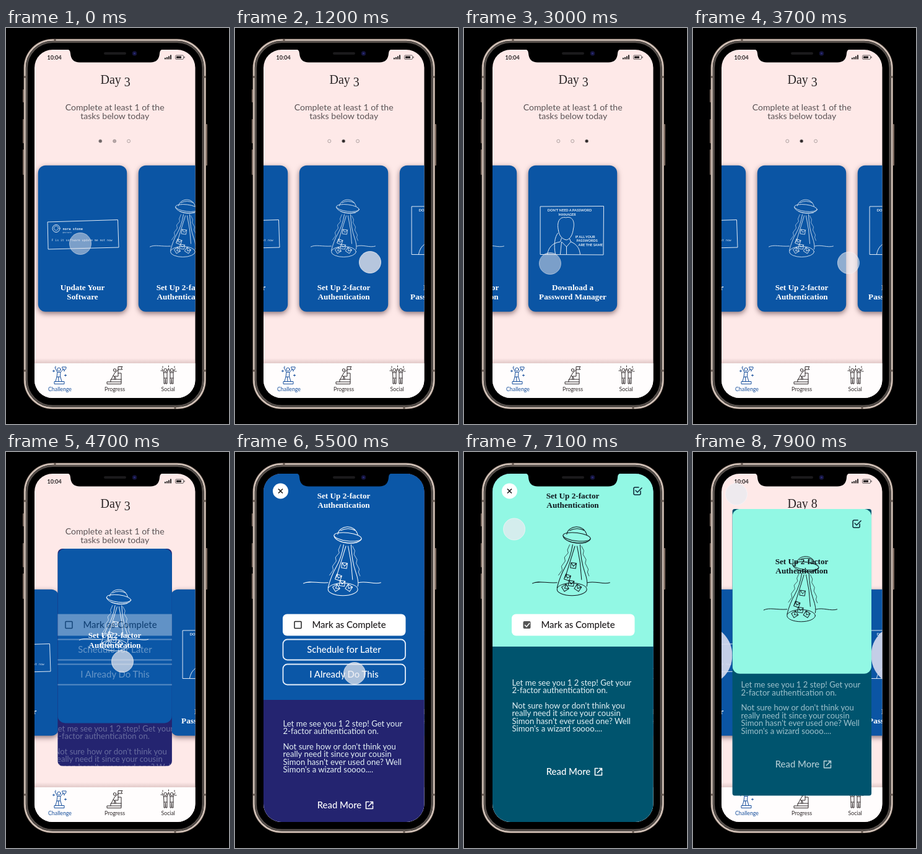
An HTML page for the animation above (8000 ms loop, 360 px wide and 639 px high).

```html
<!DOCTYPE html>
<html lang="en">
<head>
<meta charset="utf-8">
<title>Daily challenge</title>
<style>
  html, body { margin: 0; width: 100%; height: 100%; overflow: hidden; background: #000; }
  svg { display: block; width: 360px; height: 639px; }
  text { font-family: Quicksand, Lato, sans-serif; }
  .mid { text-anchor: middle; }
  .head { font: 700 13.2px "Playfair Display", "Liberation Serif", serif; text-anchor: middle; }
  .day { font: 20px "Playfair Display", "Liberation Serif", serif; fill: #2a2526; }
  .lead { font-size: 14.1px; fill: #5c5456; }
  .nav { font-size: 8.8px; text-anchor: middle; }
  .btn { font-family: Quicksand, "Lato Medium", Lato, sans-serif; font-size: 14.9px; font-weight: 500; text-anchor: middle; }
  .copy { font-size: 13.1px; fill: #e4f1f5; }
  .note { font-family: "DejaVu Sans Mono", monospace; fill: #dfe9f5; }
  .caps { font: 700 5.6px Lato, sans-serif; fill: #e8f0f8; }
  .line { fill: none; stroke: currentColor; stroke-linecap: round; stroke-linejoin: round; }
  #rail { filter: drop-shadow(0 3px 4px rgba(80, 50, 60, .65)); }
</style>
</head>
<body>
<svg viewBox="0 0 360 639">
  <defs>
    <clipPath id="screen"><rect x="46" y="35" width="259.500" height="562" rx="29"/></clipPath>
    <clipPath id="boxClip"><rect id="boxShape"/></clipPath>
    <linearGradient id="navShade" x2="0" y2="1">
      <stop offset="0" stop-color="#a08080" stop-opacity="0"/><stop offset="1" stop-color="#a08080" stop-opacity=".3"/>
    </linearGradient>

    <g id="ufo" class="line" stroke-width=".85">
      <path d="M-6 -66C-4 -78 17 -81 21 -65M-2 -71Q8 -76 18 -71"/>
      <ellipse cx="7.500" cy="-62.500" rx="18.500" ry="5.500" transform="rotate(7 7.500 -62.500)"/>
      <path d="M-11 -64C-9 -53 23 -51 26 -60M-4 -57Q7 -52 20 -55"/>
      <path d="M2 -52Q-1 -34 -8 -22T-19 6M12 -52Q13 -30 18 -16T21 4M5 -50L-8 -8M8 -50L12 -28L14 -5"/>
      <path stroke-width=".6" d="M-2 -52l-3 7 1 4-5 6 1 5-5 7 1 5-5 7M14 -50l3 6-1 5 4 7-1 5 4 8-1 4 2 5"/>
      <ellipse cx="1" cy="8" rx="20" ry="8.500"/>
      <path d="M-52 0C-44 -4 -34 0 -19 -1M22 -1C32 -4 43 2 52 -1"/>
      <path id="mail" d="M-3 -4L4 -3L3 4L-4 3ZM-3 -4L0 1L4 -3"/>
      <use href="#mail" transform="translate(3 -24)"/>
      <use href="#mail" transform="translate(-5 -8) rotate(12)"/>
      <use href="#mail" transform="translate(-8 6) rotate(50)"/>
      <use href="#mail" transform="translate(9 6) rotate(25)"/>
    </g>
    <path id="tick" class="line" d="M5 0V4A2 2 0 0 1 3 6H-4A2 2 0 0 1 -6 4V-4A2 2 0 0 1 -4 -6H2M-3 -1L0 2L7 -5" stroke-width="1.500"/>
  </defs>

  <rect width="360" height="639"/>
  <!-- phone body -->
  <g fill="#7d6b61">
    <rect x="27" y="99" width="3" height="21" rx="1"/>
    <rect x="27" y="147" width="3" height="39" rx="1"/>
    <rect x="27" y="196" width="3" height="41" rx="1"/>
    <rect x="322" y="155" width="3" height="67" rx="1"/>
  </g>
  <rect x="28.500" y="17.500" width="294.500" height="597.500" rx="47" fill="#75655c"/>
  <rect x="30.500" y="19.500" width="290.500" height="593.500" rx="45" stroke="#d3c3b9" stroke-width="2.500"/>
  <rect x="33.500" y="22.500" width="284.500" height="587.500" rx="42" stroke="#57504c" stroke-width="3"/>
  <path d="M29 79h4M29 553h4M319 79h4M319 553h4M79 18v4M273 611v4" stroke="#665a53" stroke-width="3"/>

  <g clip-path="url(#screen)">
    <rect x="46" y="35" width="260" height="562" fill="#fee9e8"/>
    <g fill="#2b2728">
      <text x="66.500" y="50.500" font-size="9" font-weight="700">10:04</text>
      <path d="M256 48h2v2.500h-2zM259 47h2v3.500h-2zM262 45.500h2v5h-2zM265 43.500h2v7h-2z"/>
      <rect x="273.500" y="44" width="13" height="6.500" rx="1.500" fill="none" stroke="#6d6566"/>
      <path d="M275 45.500h8v3.500h-8zM287.500 46h1v2.500h-1z"/>
    </g>
    <text x="152.500" y="89.500" class="day">Day <tspan id="dayNo"></tspan></text>
    <text x="175.700" y="132.500" class="lead mid">Complete at least 1 of the</text>
    <text x="175.700" y="146.500" class="lead mid">tasks below today</text>
    <g id="dots" stroke="#8b8182" stroke-width=".7"></g>

    <g id="rail">
      <g class="card">
        <path class="line" d="M-56 313L57 309.500L58.500 354L-55 357Z" stroke-width="1"/>
        <circle cx="-42.500" cy="323.500" r="6" class="line"/>
        <circle cx="-42.500" cy="323" r="3.500" class="line" stroke-width=".7"/>
        <text x="-32" y="325.500" class="note" font-size="5.400" font-weight="700">nora stone</text>
        <text x="-32" y="330.500" class="note" font-size="3">@norastn</text>
        <text x="-50" y="344" class="note" font-size="4.800">F is it software update me not now</text>
        <text y="422.500" class="head">Update Your</text><text y="438" class="head">Software</text>
      </g>
      <g class="card">
        <use href="#ufo" x="-1" y="353"/>
        <text y="422.500" class="head">Set Up 2-factor</text><text y="438" class="head">Authentication</text>
      </g>
      <g class="card">
        <path class="line" d="M-52 288L50 287.500L49.500 366L-52 365.500Z"/>
        <text x="-5" y="296" class="caps mid">DON'T NEED A PASSWORD</text>
        <text x="-9" y="302.500" class="caps mid">MANAGER</text>
        <path class="line" d="M-23 327C-27 309 -18 304 -11 306C-1 303 4 312 1 324C0 333 -4 341 -10 342C-17 341 -22 335 -23 327ZM-18 339L-20 345C-34 347 -39 355 -41 365M-5 340L-3 345C7 349 11 356 12 365M-28 365C-31 350 -29 337 -24 331M-20 365L-18 345L-10 353L-3 345M-10 353V365"/>
        <text x="4" y="338.500" class="caps">IF ALL YOUR</text>
        <text x="6" y="345" class="caps">PASSWORDS</text>
        <text x="9" y="351.500" class="caps">ARE THE SAME</text>
        <text y="422.500" class="head">Download a</text><text y="438" class="head">Password Manager</text>
      </g>
    </g>

    <!-- tab bar -->
    <rect x="46" y="533" width="260" height="8" fill="url(#navShade)"/>
    <rect x="46" y="541" width="260" height="56" fill="#fffdfd"/>
    <g color="#174f9c">
      <path class="line" d="M79 548L83 555.500H88L93 550M83 555.500L82 563L80 570M88 555.500L87.500 562L90 570M82 563H87.500M84.500 563L85 570M78 574V570.500H94V574ZM91 547H97V549Q96 552 94 552Q92 552 91 549ZM94 552V554M77 552v3M75.500 553.500h3M96 559v3M94.500 560.500h3M80 546v2"/>
      <circle class="line" cx="85.500" cy="551" r="2.700"/>
      <text x="87" y="586" class="nav" fill="#174f9c">Challenge</text>
    </g>
    <g color="#2f292a">
      <path class="line" d="M163 574V571H169V567H175V562H181V557H186V574ZM181 557V546.500H188L186 549L188 551H181M176 556L181 552M176 556L173 561L177 564V567M173 561L170 567M169 571H186M175 567H186"/>
      <circle class="line" cx="175.500" cy="552" r="2.200"/>
      <text x="175.500" y="586" class="nav" fill="#2f292a">Progress</text>
      <path class="line" d="M252 550L254.500 556H260L262.500 549L265 556H270L273 550M254.500 556L255 565V574H257L257.500 566L258 574H260V556M265 556V574H267L267.500 566L268 574H270V556M255 565H260M265 565H270M262.500 545v2M253 546v2M272 546v2M250 553h2M273 554h2"/>
      <circle class="line" cx="257.300" cy="552" r="2.400"/><circle class="line" cx="267.700" cy="552" r="2.400"/>
      <text x="261.700" y="586" class="nav" fill="#2f292a">Social</text>
    </g>

    <!-- expanded task -->
    <g id="detail" clip-path="url(#boxClip)">
      <rect id="panel" x="46" y="35" width="260" height="562"/>
      <rect id="cover"/>
      <g id="art"><use href="#ufo"/></g>
      <g id="title"><text x="175.500" y="74.500" class="head">Set Up 2-factor</text><text x="175.500" y="90" class="head">Authentication</text></g>
      <use id="done" href="#tick" color="#0c2434"/>
      <g id="controls">
        <rect x="77" y="261.500" width="198.500" height="35" rx="7" fill="#fff"/>
        <rect id="empty" x="96" y="273.500" width="11" height="11" rx="1" fill="none" stroke="#222" stroke-width="1.500"/>
        <g id="checked"><rect x="95.500" y="273" width="12" height="12" rx="2" fill="#555"/><path d="M98 279l3 3 5-6" fill="none" stroke="#fff" stroke-width="1.500"/></g>
        <text x="184" y="284" class="btn" fill="#1d1a1b">Mark as Complete</text>
        <g id="extra">
          <rect x="77.500" y="302.500" width="197.500" height="33" rx="7" fill="none" stroke="#e4eefa" stroke-width="1.800"/>
          <rect x="77.500" y="342.500" width="197.500" height="33" rx="7" fill="none" stroke="#e4eefa" stroke-width="1.800"/>
          <text x="176" y="324" class="btn" fill="#fff">Schedule for Later</text>
          <text x="176" y="364" class="btn" fill="#fff">I Already Do This</text>
        </g>
        <circle cx="73.500" cy="63" r="12.500" fill="#fff"/>
        <path d="M70 59.500l7 7m0-7l-7 7" stroke="#111" stroke-width="1.500"/>
      </g>
      <g id="copy" class="copy">
        <text x="77.500" y="442.500">Let me see you 1 2 step! Get your</text>
        <text x="77.500" y="455">2-factor authentication on.</text>
        <text x="77.500" y="479.500">Not sure how or don't think you</text>
        <text x="77.500" y="492">really need it since your cousin</text>
        <text x="77.500" y="504.500">Simon hasn't ever used one? Well</text>
        <text x="77.500" y="517">Simon's a wizard soooo....</text>
      </g>
      <g id="more" fill="#fff" color="#fff">
        <text x="168.500" y="575" class="btn">Read More</text>
        <path class="line" d="M216 564.500H211.500V575.500H222.500V571M218.500 564.500H222.500V568.500M222.500 564.500L215.500 571.500" stroke-width="1.600"/>
      </g>
    </g>
  </g>

  <!-- notch -->
  <path d="M98 34Q104 35 104 41Q105 55.500 119 55.500H233Q247 55.500 248 41Q248 35 254 34Z"/>
  <rect x="158" y="39" width="36" height="4" rx="2" fill="#1b1a1c"/>
  <circle cx="207.500" cy="41" r="3.800" fill="#14143a"/><circle cx="207.500" cy="41" r="1.600" fill="#2b2b78"/>
  <circle id="touch" r="17.500" fill="#ebeaf0" stroke="#f6f4f6" stroke-width="1"/>
</svg>
<script>
const NS = 'http://www.w3.org/2000/svg';
const LOOP = 8000, STEP = 100, PITCH = 162, MID = 175.5;
const $ = id => document.getElementById(id);
const set = (el, attrs) => { for (const k in attrs) el.setAttribute(k, attrs[k]); return el; };
const make = (tag, attrs) => set(document.createElementNS(NS, tag), attrs);
const mix = (a, b, p) => a + (b - a) * p;
const blend = (a, b, p) => `rgb(${a.map((v, i) => Math.round(mix(v, b[i], p)))})`;
const shift = y => `translate(0 ${y})`;

// Each row is a time followed by the values held at that time.
const scroll = [[-300, 0], [0, 52], [450, 162], [1300, 162], [2100, 272], [2500, 324], [3050, 324], [3650, 162]];
const opened = [[4500, 0], [5000, 1], [7800, 1], [7900, .695]];
const marked = [[6200, 0], [6600, 1]];
const finger = [
  [0, 120, 348, .5], [350, 78, 346, .45], [600, 84, 350, .65], [1100, 218, 378, .76], [1300, 218, 378, .76],
  [1600, 200, 378, .48], [2100, 110, 378, .48], [2400, 82, 378, .55], [2800, 130, 380, .7], [3050, 140, 380, .48],
  [3600, 248, 379, .5], [3750, 252, 379, .62], [4250, 190, 340, .75], [4450, 188, 338, .45], [4700, 188, 338, .7],
  [5300, 193, 357, .72], [5500, 193, 357, .72], [6000, 106, 283, .75], [6200, 106, 283, .5], [6400, 107, 283, .6],
  [6700, 107, 283, .72], [7300, 72, 69, .75], [7500, 70, 68, .85]
];

function at(track, t) {
  const i = track.findIndex(row => row[0] > t);
  if (i === 0) return track[0].slice(1);
  if (i < 0) return track[track.length - 1].slice(1);
  const a = track[i - 1], b = track[i];
  const p = (t - a[0]) / (b[0] - a[0]), e = p * p * (3 - 2 * p);
  return a.slice(1).map((v, k) => mix(v, b[k + 1], e));
}

const badges = [];
document.querySelectorAll('.card').forEach((card, i) => {
  set(card, { transform: `translate(${i * PITCH} 0)`, color: '#e2ebf5', fill: '#fff' });
  card.prepend(make('rect', { x: -71.7, y: 221.7, width: 143.4, height: 236, rx: 12, fill: '#0b55a4' }));
  badges.push(card.appendChild(make('circle', { cy: 328, r: 50, fill: '#d9dcef', 'fill-opacity': .9 })));
});
const dots = [0, 1, 2].map(i =>
  $('dots').appendChild(make('circle', { cx: 152.3 + i * 22.9, cy: 182.5, r: 2.5, fill: '#2c2728' })));

function drawDetail(o, c, closing) {
  const gone = 1 - o;
  const x = mix(103.8, 46, o), y = mix(221.7, 35, o);
  const right = mix(247.2, 306, o), bottom = mix(457.7, 597, o);
  const edge = mix(457.7, mix(400, 314, c), o);
  const r = 12 * Math.min(1, gone * 4);
  const ink = blend([255, 255, 255], [14, 22, 28], Math.min(1, c * 1.5));
  $('detail').style.display = o > 0 ? '' : 'none';
  set($('boxShape'), { x, y, width: right - x, height: bottom - y, rx: 12 * gone });
  set($('cover'), { x, y, width: right - x, height: edge - y, rx: r, fill: blend([11, 87, 167], [146, 248, 228], c) });
  set($('panel'), { fill: blend([36, 36, 112], [0, 84, 110], c) });
  set($('art'), {
    transform: `translate(${mix(174.5, 173, o)} ${mix(353, 212, o)}) scale(${mix(1, 1.2, o)})`, color: ink
  });
  set($('title'), { transform: shift(348 * gone), fill: ink });
  set($('done'), { transform: `translate(${mix(228, 280, o)} ${mix(237, 63, o)})`, opacity: c });
  set($('controls'), { opacity: closing ? 0 : o });
  set($('extra'), { opacity: 1 - c });
  set($('empty'), { opacity: 1 - c });
  set($('checked'), { opacity: c });
  set($('copy'), { transform: shift(-66 * c + 13 * gone), opacity: o });
  set($('more'), { transform: shift(-54 * c - 39 * gone), opacity: o });
}

function draw(t) {
  const [s] = at(scroll, t), [o] = at(opened, t), [c] = at(marked, t), [x, y, a] = at(finger, t);
  const closing = t > 7800;
  set($('rail'), { transform: `translate(${MID - s} 0)` });
  dots.forEach((dot, i) => set(dot, { 'fill-opacity': Math.max(0, 1 - Math.abs(s / PITCH - i)) }));
  badges.forEach(badge => set(badge, { opacity: closing ? 1 : 0 }));
  $('dayNo').textContent = closing ? '8' : '3';
  set($('dayNo'), { dy: closing ? 0 : 4 });
  drawDetail(o, c, closing);
  set($('touch'), { cx: x, cy: y, 'fill-opacity': a, 'stroke-opacity': a });
}

const start = performance.now();
function tick() {
  const t = (performance.now() - start) % LOOP;
  draw(Math.floor(t / STEP) * STEP);
  requestAnimationFrame(tick);
}
tick();
</script>
</body>
</html>
```
